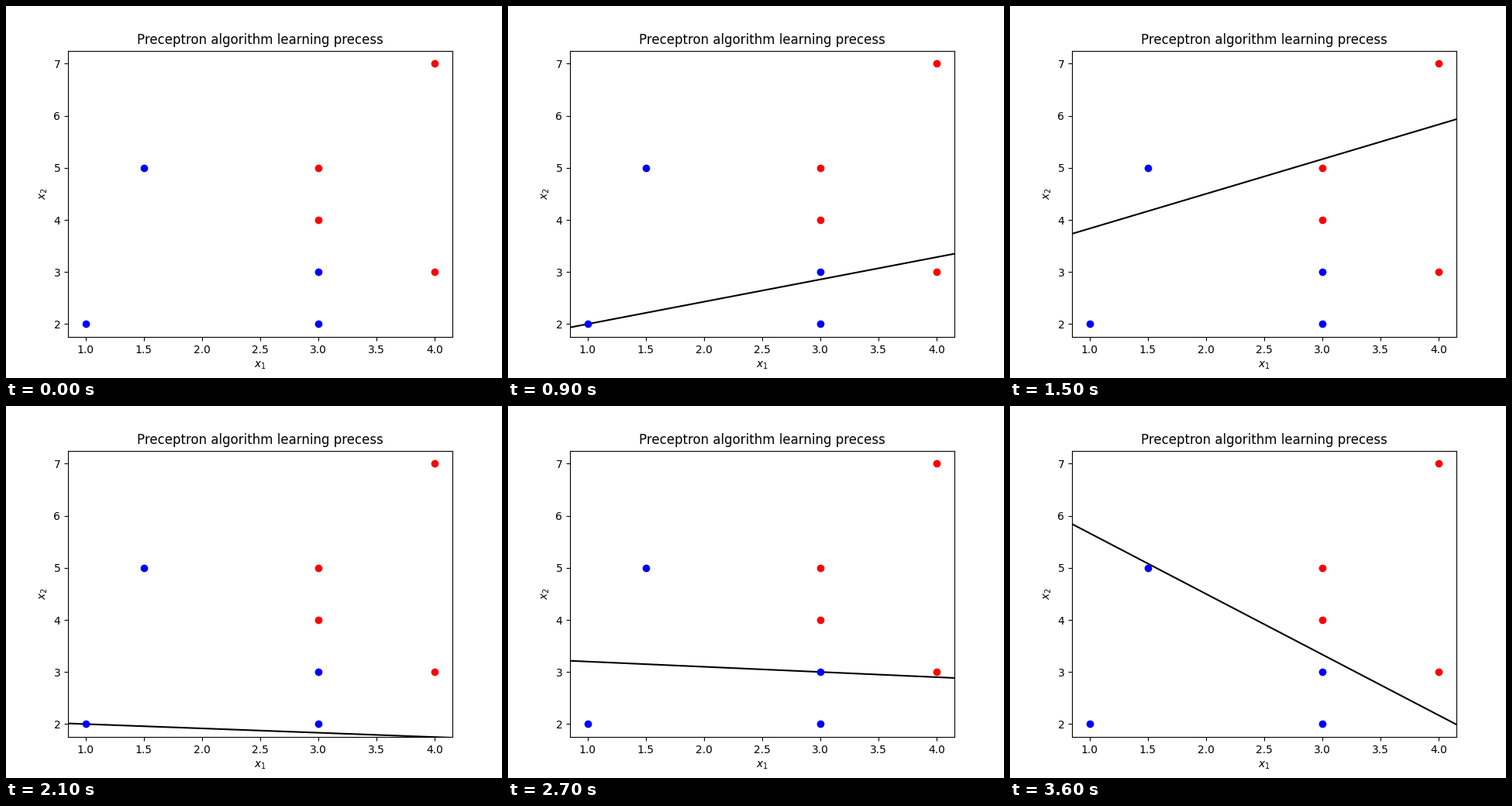
A matplotlib script that plays this animation: 640x480 px, repeating every 4500 ms.

```python
import numpy as np
import matplotlib.pyplot as plt
from matplotlib.animation import FuncAnimation

STEP_MS = 300
STEPS = 15
RUN = 5  # four visible boundaries, then one out of view
RED = [(3, 4), (3, 5), (4, 3), (4, 7)]
BLUE = [(1, 2), (1.5, 5), (3, 2), (3, 3)]


def weights(step):
    """Boundary w1*x1 + w2*x2 + b = 0, or None while it is out of view."""
    run, k = divmod(step - 2, RUN)
    if run < 0 or k == RUN - 1:
        return None
    pair, odd = divmod(k, 2)
    if run == 0:  # tilted line climbs
        return -3 - pair * (2 - odd), 8 - odd * (1 + pair), -7 - 4 * k
    if run == 1:  # nearly level line climbs
        return 1 - odd, 12 - pair * (2 + odd), -25 - 4 * k
    return 7, 6, -41  # learned


plt.rcParams["font.family"] = "DejaVu Sans"
fig, ax = plt.subplots(figsize=(6.4, 4.8), dpi=100)
ax.set_title("Preceptron algorithm learning precess")
ax.set_xlabel("$x_1$")
ax.set_ylabel("$x_2$")

for points, color in ((RED, "red"), (BLUE, "blue")):
    ax.plot(*zip(*points), "o", color=color, zorder=3)
ax.set_xlim(0.85, 4.15)
ax.set_ylim(1.75, 7.25)

xs = np.array([0.0, 5.0])
boundary, = ax.plot([], [], color="black", lw=1.5, zorder=2)


def draw(step):
    line = weights(step)
    if line is None:
        boundary.set_data([], [])
    else:
        w1, w2, b = line
        boundary.set_data(xs, -(w1 * xs + b) / w2)
    return boundary,


anim = FuncAnimation(fig, draw, frames=STEPS, interval=STEP_MS,
                     repeat=True, repeat_delay=0)
plt.show()
```
